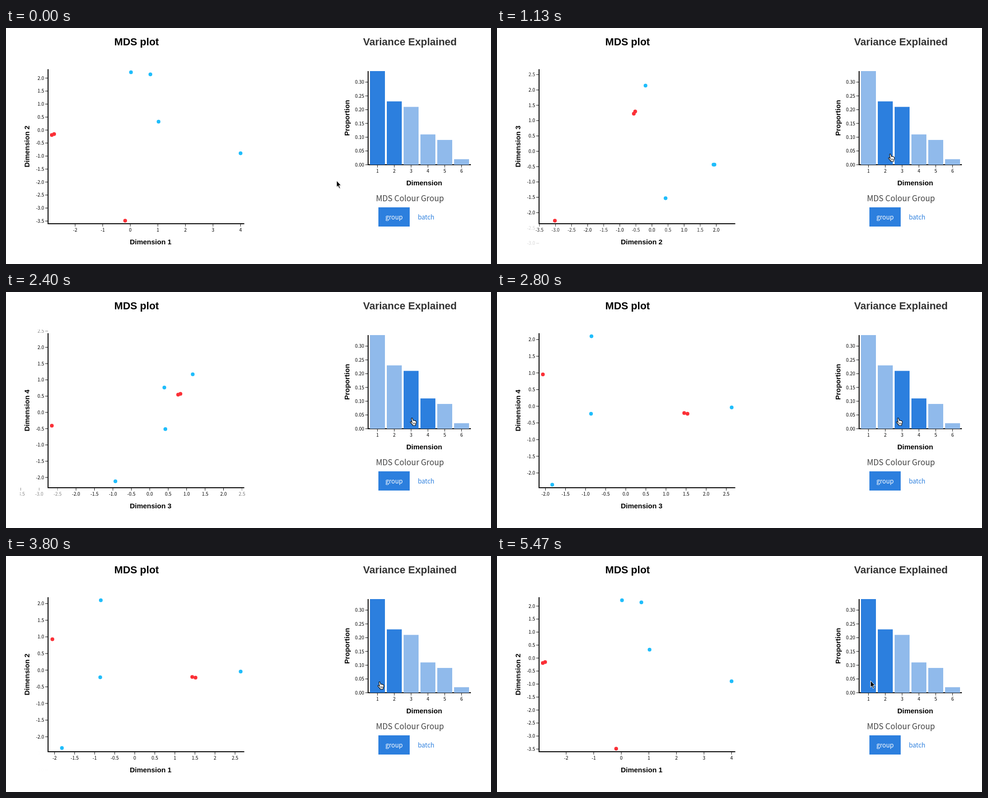
These frames come from a looping animation (1038 px wide and 504 px high, 5670 ms). An HTML page:

```html
<!DOCTYPE html>
<html lang="en">
<head>
<meta charset="utf-8">
<title>MDS plot</title>
<style>
html, body { margin: 0; width: 100%; height: 100%; overflow: hidden; background: #fff; }
svg { display: block; }
text { font-family: "Noto Sans CJK JP", "Noto Sans CJK SC", "Noto Sans CJK", "Noto Sans", sans-serif; }
.tick { font-size: 10px; }
.title, .label { font-family: "Liberation Sans", Arial, sans-serif; font-weight: bold; text-anchor: middle; }
.title { font-size: 22px; }
.label { font-size: 15px; }
.mid { text-anchor: middle; }
.end { text-anchor: end; }
</style>
</head>
<body>
<svg width="1038" height="504" viewBox="0 0 1038 504">
  <clipPath id="area"><rect x="30" y="80" width="490" height="383"/></clipPath>
  <text class="title" x="279.5" y="37">MDS plot</text>
  <text class="title" x="864.5" y="37" fill="#333">Variance Explained</text>
  <g id="plot" clip-path="url(#area)"></g>
  <g id="bars"></g>
  <text class="label" x="895" y="336">Dimension</text>
  <text class="label" transform="translate(735 192) rotate(-90)">Proportion</text>
  <text class="mid" x="864.5" y="370" font-size="17" font-weight="300" fill="#444">MDS Colour Group</text>
  <rect x="797" y="383" width="67" height="41" fill="#2c7fde"/>
  <text class="mid" x="830.5" y="409" font-size="13.4" fill="#fff">group</text>
  <text class="mid" x="899" y="409" font-size="13.4" fill="#2c7fde">batch</text>
  <g id="arrow">
    <path d="M1 1V15L4 12.2L6.4 17.5L8.8 16.4L6.4 11.3H10.4Z" fill="#000" opacity=".22"/>
    <path d="M0 0V13.8L3.1 10.9L5.4 16.4L7.7 15.4L5.4 10.1H9.6Z" stroke="#fff"/>
  </g>
  <g id="hand">
    <path d="M-1 1Q.5 -.7 1.6 1L3 5.5Q4 4.5 5.2 5.6Q6.5 5 7.4 6.4Q9.3 6 9.6 8.5Q9.8 11 8.3 13.5L8 16H2L1.5 14.5Q-1.4 11.5 -3 9.6Q-3.7 7.8 -2 7.8Q-1 8 .6 9.8Z"
      fill="#fff" stroke="#000" stroke-width="1.1"/>
    <path d="M3 10V13.4M5 10V13.4M7 10V13.4" stroke="#000" stroke-width=".8"/>
  </g>
</svg>
<script>
const LOOP = 5670, STEP = 1000 / 15, MOVE = 500;
const RED = '#fb3037', BLUE = '#1fbdfb';
const el = id => document.getElementById(id);
const lerp = (a, b, f) => a + (b - a) * f;
const cubic = t => t < .5 ? 4 * t ** 3 : 1 - 4 * (1 - t) ** 3;
const smooth = t => t * t * (3 - 2 * t);

// coordinates of each sample in dimensions 1 to 4
const samples = [
  [.025, 2.225, -.866, -.225], [.729, 2.144, -.855, 2.1],
  [1.025, .324, -1.831, -2.353], [4, -.892, 2.634, -.035],
  [-2.847, -.189, 1.453, -.204], [-2.763, -.153, 1.535, -.225],
  [-.186, -3.486, -2.064, .955]
];
// view n shows dimensions n+1 and n+2; a scale has zero position, pixels per unit, tick step
const views = [
  { x: [266, 59, 1], y: [218, -55.5, .5] },
  { x: [344.6, 70.74, .5], y: [272.2, -67.47, .5] },
  { x: [275.7, 86, .5], y: [244, -71.2, .5] }
];
const changes = [[806, 0, 1], [2144, 1, 2], [3740, 2, 0]];
const CUT = 4060;

// time, x, y of the pointer
const path = [
  [0, 707, 326], [600, 841, 271], [667, 841, 269], [1533, 841, 269], [2133, 868.5, 269],
  [2733, 868.5, 269], [3067, 816, 269], [3267, 799, 268.5], [LOOP, 799, 268.5]
];

const line = (x1, y1, x2, y2, w = 1) =>
  `<path d="M${x1} ${y1}L${x2} ${y2}" stroke="#000" stroke-width="${w}"/>`;
const tickX = (x, y, s) => line(x, y, x, y + 6) +
  `<text class="tick mid" x="${x}" y="${y + 17}">${s}</text>`;
const tickY = (x, y, s) => line(x - 6, y, x, y) +
  `<text class="tick end" x="${x - 8.5}" y="${y + 3.7}">${s}</text>`;

const pos = (scale, v) => scale[0] + scale[1] * v;

function tickMap(scale, lo, hi) {
  const map = new Map(), step = scale[2];
  for (let i = -10; i <= 10; i++) {
    const p = pos(scale, i * step);
    if (p >= lo && p <= hi) map.set(i * step, (i * step).toFixed(step < 1 ? 1 : 0));
  }
  return map;
}

function axis(from, to, f, lo, hi, draw) {
  const before = tickMap(from, lo, hi), after = tickMap(to, lo, hi);
  let out = '';
  for (const [v, s] of new Map([...before, ...after])) {
    const alpha = !after.has(v) ? 1 - f : before.has(v) ? 1 : f;
    if (alpha > 0)
      out += `<g opacity="${alpha}">${draw(lerp(pos(from, v), pos(to, v), f), s)}</g>`;
  }
  return out;
}

function drawPlot(t) {
  const [start, a, b] = changes.filter(c => c[0] <= t).pop() || [-MOVE, 0, 0];
  const f = t > CUT ? 1 : cubic(Math.min(1, (t - start) / MOVE));
  const A = views[a], B = views[b];
  let out = axis(A.x, B.x, f, 90, 510, (p, s) => tickX(p, 418, s)) +
    axis(A.y, B.y, f, 88, 418, (p, s) => tickY(90, p, s)) +
    line(90, 88, 90, 419, 2) + line(89, 418, 510, 418, 2) +
    `<text class="label" x="309.5" y="462">Dimension ${b + 1}</text>` +
    `<text class="label" transform="translate(50 253) rotate(-90)">Dimension ${b + 2}</text>`;
  samples.forEach((d, i) => {
    const x = lerp(pos(A.x, d[a]), pos(B.x, d[b]), f);
    const y = lerp(pos(A.y, d[a + 1]), pos(B.y, d[b + 1]), f);
    out += `<circle cx="${x}" cy="${y}" r="4" fill="${i < 4 ? BLUE : RED}"/>`;
  });
  el('plot').innerHTML = out;
}

function drawBars(active) {
  let out = line(775, 92, 775, 293, 2) + line(774, 292, 995, 292, 2);
  for (let i = 0; i < 7; i++) out += tickY(775, 292 - i * 29.4, (i * .05).toFixed(2));
  [.34, .23, .21, .11, .09, .02].forEach((v, i) => {
    const h = v * 200 / .34, on = i === active || i === active + 1;
    out += tickX(795 + 36 * i, 292, i + 1) +
      `<rect x="${779 + 36 * i}" y="${292 - h}" width="32" height="${h}" fill="${on ? '#2c7fde' : '#90baeb'}"/>`;
  });
  el('bars').innerHTML = out;
}

function pointer(t) {
  const i = path.findIndex(p => p[0] > t), p = path[i - 1], q = path[i];
  let f = (t - p[0]) / (q[0] - p[0]);
  if (t < 2700) f = smooth(f);
  return [lerp(p[1], q[1], f), lerp(p[2], q[2], f)];
}

function drawPointer(t) {
  const [x, y] = pointer(t);
  const over = x >= 779 && y < 292;
  const hand = over && t < 5460;
  el('hand').style.display = hand ? '' : 'none';
  el('arrow').style.display = hand ? 'none' : '';
  el('hand').setAttribute('transform', `translate(${x} ${y})`);
  el('arrow').setAttribute('transform', `translate(${x + .5} ${over ? y - 2 : y})`);
  // the bar under the pointer and the next one are lit
  drawBars(over ? Math.floor((x - 779) / 36) : 0);
}

const origin = performance.now();
function frame() {
  const now = (performance.now() - origin) % LOOP;
  const t = Math.floor((now + 5) / STEP) * STEP;
  drawPlot(t);
  drawPointer(Math.min(t, LOOP - 1));
  requestAnimationFrame(frame);
}
frame();
</script>
</body>
</html>
```
